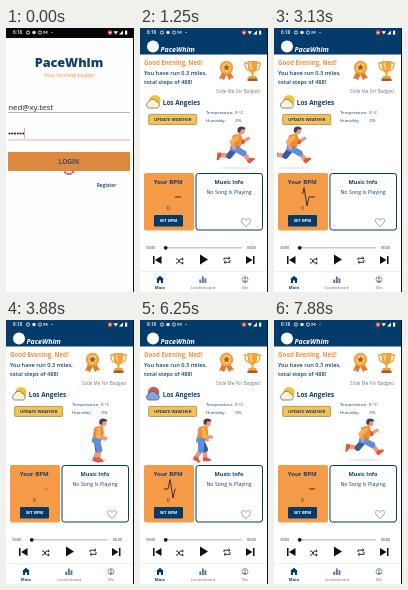
An HTML page for the animation above (8000 ms loop, 128 by 264 pixels).

```html
<!DOCTYPE html>
<html lang="en">
<head>
<meta charset="utf-8">
<title>Running app</title>
<style>
  html, body { margin: 0; width: 100%; height: 100%; overflow: hidden; background: #fff; }
  svg { display: block; width: 100vw; height: 100vh; }
  text { font-family: "Open Sans", "Noto Sans", sans-serif; fill: #123f6d; }
  .b { font-weight: 700; }
  .s { font-weight: 600; }
  .x { font-weight: 800; }
  .i { font-style: italic; }
  .mid { text-anchor: middle; }
  .or { fill: #f3913a; }
  .w { fill: #fff; }
  .g { fill: #777; }
  .k { fill: #222; }
</style>
</head>
<body>
<svg id="stage" viewBox="0 0 128 264" preserveAspectRatio="none"></svg>
<script>
const LOOP = 8000, LOGIN_END = 500;
const NAVY = '#033b6b', ORANGE = '#f59b47', SKIN = '#ee9a78', BLUE = '#5b8fe0';

const text = (x, y, size, cls, str) =>
  `<text x="${x}" y="${y}" font-size="${size}" class="${cls}">${str}</text>`;
const box = (x, y, w, h, fill, more = '') =>
  `<rect x="${x}" y="${y}" width="${w}" height="${h}" fill="${fill}" ${more}/>`;
const dot = (x, y, r, fill, more = '') =>
  `<circle cx="${x}" cy="${y}" r="${r}" fill="${fill}" ${more}/>`;
const fill = (d, color) => `<path d="${d}" fill="${color}"/>`;
const line = (d, color, width = 1, more = '') =>
  `<path d="${d}" fill="none" stroke="${color}" stroke-width="${width}" ${more}/>`;

const statusBar = () =>
  text(7, 6.2, 4.6, 's w', '6:18') +
  dot(22, 4.5, 1.6, 'none', 'stroke="#fff" stroke-width=".8"') +
  dot(28, 4.5, 1.8, '#ddd') +
  dot(34, 4.5, 1.6, 'none', 'stroke="#ddd" stroke-width=".9"') +
  line('M38 6V3l1.5 2L41 3v3', '#ddd', .8) + dot(46, 4.5, .6, '#fff') +
  dot(104, 4.6, 2.3, '#e8543c') + dot(104, 4.6, .9, '#fff') +
  fill('M107.500 3.200h4.500l-2.200 3.300z', '#fff') + fill('M113 6.500h4v-4z', '#fff') +
  box(119, 2.6, 2.2, 4, '#fff');

const login = () =>
  box(0, 0, 128, 264, '#fefefe') + box(0, 0, 128, 10, '#050505') + statusBar() +
  text(63, 38.5, 12.6, 'x mid', 'PaceWhim') +
  text(62.5, 49, 5.7, 'i or mid', 'Your running buddy') +
  text(2.2, 81.7, 7.9, 'k', 'ned@xy.test') +
  box(2, 84, 122, .7, '#999') +
  [0, 1, 2, 3, 4, 5].map(n => dot(3.5 + n * 2.75, 105.5, 1.05, '#222')).join('') +
  box(18.2, 100, .7, 10.5, '#e9836b') + box(2, 111.5, 122, .9, '#e7a79b') +
  `<g id="spinner">${dot(63, 140.5, 5.5, 'none', 'stroke="#d8434a" stroke-width="2" stroke-dasharray="2.2 .68"')}</g>` +
  box(2, 124, 122, 19, '#dd8a40') +
  text(63, 136.2, 6.5, 's mid', 'LOGIN') +
  text(100.5, 158.7, 5, 's mid', 'Register');

const badges = () =>
  fill('M82 44l-3 7 3-.5 2 2 3-7zM90 44l4 6-3 .2-2 2-3-7z', '#e57a2f') +
  dot(86.5, 39.5, 6.8, '#f4a23e') + dot(86.5, 39.5, 4.5, '#ffc768') +
  fill('M86.5 36l1 2.3 2.5.2-1.9 1.6.6 2.5-2.2-1.4-2.2 1.4.6-2.5-1.9-1.6 2.5-.2z', '#9a5a2c') +
  line('M108 35h-3.2c0 5 1.5 7 4.5 7.5M117 35h3.2c0 5-1.5 7-4.5 7.5', '#e9a340', 1.3) +
  fill('M107.5 33h10c0 7-1 10.5-4 12v3h3v3.5h-8V48h3v-3c-3-1.5-4-5-4-12z', '#f2a23c') +
  fill('M109.5 34.5h2c0 4 .4 6 1 8-2-1-3-4-3-8z', '#ffd48a') +
  box(107.5, 50.5, 10, 2.5, '#a95a2c');

const cloud = (color, edge) =>
  `<path d="M8.500 80a3.200 3.200 0 0 1 .2-6 4 4 0 0 1 7.400-.6 3.600 3.600 0 0 1 1.500 6.600z" fill="${color}" stroke="${edge}" stroke-width=".8"/>`;

const weather = () =>
  `<g id="sunny">${dot(15, 72.5, 5.6, '#fbbf2c')}${cloud('#fff3cf', '#47739f')}</g>` +
  `<g id="storm">${dot(13.5, 72.3, 5.6, '#d9584b')}${cloud('#7fa8d8', '#345f92')}</g>` +
  text(22.8, 77.4, 6.4, 'b', 'Los Angeles') +
  box(8.7, 86.4, 48, 10, '#f6c256', 'rx=".8" stroke="#a4864a" stroke-width=".8"') +
  text(32.7, 93, 4.25, 'b mid', 'UPDATE WEATHER') +
  text(66, 86.2, 4.35, '', 'Temperature:') + text(95, 86.2, 4.35, '', '0 °C') +
  text(66, 94.4, 4.35, '', 'Humidity:') + text(95.5, 94.4, 4.35, '', '0%');

const cards = () =>
  box(4, 145, 50, 57.5, ORANGE, 'rx="2"') +
  text(28.2, 156, 6, 'b mid', 'Your BPM') +
  line('M24 169H28L30 159.500 33 178 35 169H41', '#33333c', 1, 'id="pulse" pathLength="100" stroke-linejoin="round"') +
  text(28.2, 182.3, 5.4, 'mid', '0') +
  box(14, 187, 29, 11.5, NAVY, 'rx="1.2"') + text(28.5, 194.4, 4.2, 'b w mid', 'SET BPM') +
  box(56, 145.5, 66.5, 56.5, '#fff', `rx="2.5" stroke="${NAVY}"`) +
  text(89, 156, 5.6, 'b mid', 'Music Info') +
  text(89, 166.4, 5.3, 'mid', 'No Song Is Playing') +
  line('M106 198.5c-6-4.5-5-8-2.5-8 1.4 0 2.2 1 2.5 2 .3-1 1.1-2 2.5-2 2.5 0 3.5 3.5-2.5 8z', '#8b8b8b', .8);

const player = () =>
  text(6.5, 221.2, 3.4, 'k', '00:00') + text(107, 221.2, 3.4, 'k', '00:00') +
  box(25.5, 219.4, 76.5, .9, '#a5a9ae') + dot(25.7, 219.8, 1.9, '#111') +
  box(13, 228, 1.5, 8, '#111') + fill('M21.5 228v8l-6.5-4z', '#111') +
  line('M36 231h1.500l3 4h2.500M36 235h1.500l3-4h2.500M42 229.800l1.300 1.200-1.300 1.200M42 233.800l1.300 1.200-1.300 1.200', '#111', .9) +
  fill('M60 226.5v10l8-5z', '#111') +
  line('M84 232v-1.800h5.500M90 232v2.300h-5.500M88.500 228.800l1.500 1.400-1.500 1.400M85.500 232.900l-1.500 1.400 1.500 1.400', '#111', .9) +
  fill('M106 228v8l6.500-4z', '#111') + box(113, 228, 1.5, 8, '#111');

const nav = () =>
  box(0, 243, 128, .6, '#e6e6e6') +
  fill('M20 247.800l4 3.500h-1v3.700h-2v-2.400h-2v2.400h-2v-3.700h-1z', NAVY) +
  [[59.3, 251.5, 3.5], [61.9, 248.5, 6.5], [64.5, 250.3, 4.7]].map(([x, y, h]) => box(x, y, 1.9, h, '#5d7896')).join('') +
  dot(105, 251.5, 3, 'none', 'stroke="#6c8199" stroke-width=".8"') +
  dot(105, 250.6, 1, '#6c8199') + fill('M103 253.500q2-2.400 4 0l-2 1z', '#6c8199') +
  text(20, 261, 4.1, 'b mid', 'Main') + text(63, 261, 4.1, 'g mid', 'Leaderboard') +
  text(105, 261, 4.1, 'g mid', 'Me');

const home = () =>
  box(0, 0, 128, 264, '#fff') + box(0, 0, 128, 26.5, NAVY) + statusBar() +
  dot(13, 18.5, 6, '#fff') + text(20.5, 23.5, 7, 'b i w', 'PaceWhim') +
  text(4, 37.4, 6.1, 'b or', 'Good Evening, Ned!') +
  text(4, 46.8, 5.65, 's', 'You have run 0.3 miles,') +
  text(4, 55.8, 5.65, 's', 'total steps of 488!') +
  badges() + text(98, 64.6, 4.6, 'g mid', 'Slide Me For Badged') +
  weather() + cards() + player() + nav() +
  '<clipPath id="lane"><rect x="3" y="97.5" width="120" height="47"/></clipPath>' +
  '<g clip-path="url(#lane)"><g id="runner"></g></g>';

const $ = id => document.getElementById(id);
$('stage').innerHTML = `<g id="home">${home()}</g><g id="login">${login()}</g>` +
  box(127, 0, 1, 264, '#111');

const mod = (a, n) => ((a % n) + n) % n;

function ease(keys, u) {
  const n = keys.findIndex(k => k[0] >= u);
  if (n < 1) return keys[0][1];
  const [u0, v0] = keys[n - 1], [u1, v1] = keys[n];
  return v0 + (v1 - v0) * (u - u0) / (u1 - u0);
}

// A two-part limb: angles run from straight down, positive is forward.
function limb(x, y, a, b, len, upper, lower, width) {
  const kx = x + Math.sin(a) * len, ky = y + Math.cos(a) * len;
  const ex = kx + Math.sin(b) * len, ey = ky + Math.cos(b) * len;
  const cap = 'stroke-linecap="round"';
  return { x: ex, y: ey, art:
    line(`M${kx} ${ky}L${ex} ${ey}`, lower, width * .75, cap) +
    line(`M${x} ${y}L${kx} ${ky}`, upper, width, cap) };
}

function leg(swing, pants) {
  const a = .2 + swing * .9;
  const b = a - .4 - .65 * Math.max(0, -swing);
  const l = limb(-1, 120.5, a, b, 9.5, pants, SKIN, 6);
  return l.art + `<g transform="translate(${l.x} ${l.y}) rotate(${-b * 57})">` +
    fill('M-2-1.5h3.500l4 2.200v1.800h-7.500z', '#e2553d') + '</g>';
}

function arm(swing, sleeve) {
  const a = swing * .9;
  return limb(1, 109.5, a, a + 1.25, 7, sleeve, SKIN, 4.4).art;
}

function runner(t) {
  const swing = Math.cos(Math.PI * (t - 1290) / 469);
  return `<ellipse cy="140" rx="${10 + 6 * Math.abs(swing)}" ry="1.300" fill="#ececec"/>` +
    arm(swing, '#d9532f') + leg(-swing, '#345f9f') + leg(swing, BLUE) +
    fill('M-3.500 107.500q5-3 9 0l.5 6-2.500 8q-5 2-9-1z', '#f28a35') +
    fill('M-5.500 117.500l9 1-1 4.500q-5 1.500-8.500-1z', BLUE) +
    line('M3.500 107.500l1-3', SKIN, 3) + dot(5.5, 103, 3.2, SKIN) +
    fill('M1.700 104.500q-1.500-5.500 3.300-6 4 0 4.500 2.800l-4.500.3-1 3z', '#4a3a50') +
    arm(-swing, '#fbb04c');
}

// Trailing end of the heartbeat trace, in percent of its length.
const TRIM = [[0, 0], [.17, 0], [.27, 10], [.45, 87], [.68, 88], [.98, 98.5], [1, 100]];

function draw(t) {
  $('login').style.display = t < LOGIN_END ? '' : 'none';
  $('spinner').setAttribute('transform', `rotate(${t * .27} 63 140.5)`);

  const storm = mod(t, 4000) >= 1900 && mod(t, 4000) < 2900;
  $('storm').style.display = storm ? '' : 'none';
  $('sunny').style.display = storm ? 'none' : '';

  const u = mod((t - 1250) / 1087 - .45, 1);
  const from = ease(TRIM, u), to = Math.min(100, u / .17 * 100);
  $('pulse').setAttribute('stroke-dasharray', `0 ${from} ${Math.max(0, to - from)} 200`);

  const x = -6 + mod((t - 1250) * .098 + 102, 131);
  $('runner').setAttribute('transform', `translate(${x} 0)`);
  $('runner').innerHTML = runner(t);
}

function tick() {
  draw(performance.now() % LOOP);
  requestAnimationFrame(tick);
}
tick();
</script>
</body>
</html>
```
